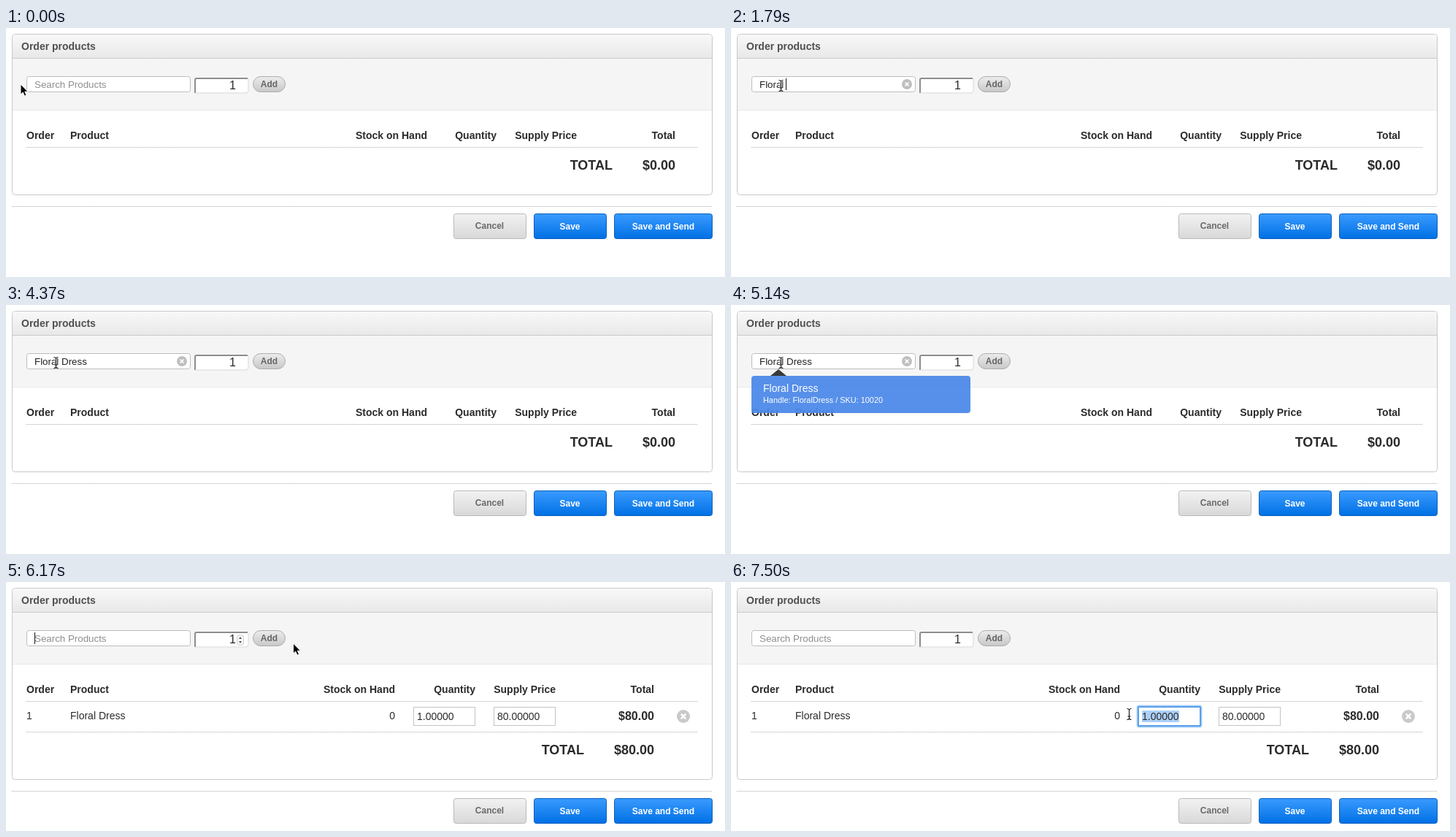
An HTML page for the animation above (8 s loop, 985 px wide and 341 px high).

```html
<!DOCTYPE html>
<html lang="en">
<head>
<meta charset="utf-8">
<title>Order products</title>
<style>
  html, body { margin: 0; width: 100%; height: 100%; overflow: hidden; background: #fff; }
  svg { display: block; font: 14px "Liberation Sans", Arial, sans-serif; cursor: default; }
  text { white-space: pre; fill: #2b2b2b; }
  .b { font-weight: bold; }
  .end { text-anchor: end; }
  .mid { text-anchor: middle; }
  .small { font-size: 12px; font-weight: bold; }
  .big { font-size: 18px; font-weight: bold; }
  .input { font-size: 13.33px; }
  .white { fill: #fff; }
  .dots { stroke: #aaa; stroke-dasharray: 1 1; }
  .field { fill: #fff; stroke: #c4c4c4; }
</style>
</head>
<body>
<svg width="985" height="341" viewBox="0 0 985 341">
  <defs>
    <linearGradient id="head" x2="0" y2="1"><stop stop-color="#f8f8f8"/><stop offset="1" stop-color="#e8e8e8"/></linearGradient>
    <linearGradient id="grey" x2="0" y2="1"><stop stop-color="#f2f2f2"/><stop offset="1" stop-color="#d8d8d8"/></linearGradient>
    <linearGradient id="pill" x2="0" y2="1"><stop stop-color="#ececec"/><stop offset="1" stop-color="#c8c8c8"/></linearGradient>
    <linearGradient id="blue" x2="0" y2="1"><stop stop-color="#3a9bff"/><stop offset="1" stop-color="#0070e4"/></linearGradient>
  </defs>

  <rect id="panel" x="8.5" y="8.5" width="959" height="220" rx="4" fill="#fff" stroke="#c8c8c8"/>
  <path d="M9 41V13q0-4 4-4H963q4 0 4 4V41Z" fill="url(#head)"/>
  <path d="M9 41.5H967" stroke="#cacaca"/>
  <path d="M9 42H967V112H9Z" fill="#f5f5f5"/>
  <path d="M9 112.5H967" stroke="#e9e9e9"/>
  <text class="b" x="21" y="30" style="fill:#505050">Order products</text>

  <rect x="28.5" y="66.5" width="224" height="21" rx="3" fill="#fff" stroke="#bdbdbd"/>
  <text id="query" class="input" x="39" y="82"></text>
  <g id="clear" transform="translate(241 77)">
    <circle r="7" fill="#bfbfbf"/><path d="M-2.5-2.5l5 5m0-5l-5 5" stroke="#fff" stroke-width="1.7"/>
  </g>
  <rect id="caret" y="69" width="1" height="16" fill="#111"/>

  <rect x="258" y="68" width="74.5" height="21.5" rx="3" fill="#fff"/>
  <path d="M259 89V71q0-2 2-2H331" fill="none" stroke="#8d8d8d" stroke-width="2"/>
  <path d="M259 89H329q3 0 3-3V69" fill="none" stroke="#d5d5d5"/>
  <text class="end" x="315" y="84" font-size="16">1</text>
  <g id="spinner">
    <rect x="316.5" y="72.5" width="9" height="14" rx="4" fill="#fafafa" stroke="#c9c9c9"/>
    <path d="M319 78l2-3 2 3ZM319 81l2 3 2-3Z" fill="#555"/>
  </g>
  <rect x="338.5" y="66.5" width="44" height="21" rx="10.5" fill="url(#pill)" stroke="#adadad"/>
  <text class="small mid" x="360.5" y="81" style="fill:#666">Add</text>

  <text class="b" x="28" y="152">Order</text>
  <text class="b" x="88" y="152">Product</text>
  <text id="stockHead" class="b end" y="152">Stock on Hand</text>
  <text id="qtyHead" class="b end" y="152">Quantity</text>
  <text id="priceHead" class="b end" y="152">Supply Price</text>
  <text id="totalHead" class="b end" y="152">Total</text>

  <text id="updating" x="28" y="183">Updating...</text>
  <g id="row">
    <path class="dots" d="M28 163.5H948"/>
    <text x="28" y="188">1</text>
    <text x="88" y="188">Floral Dress</text>
    <text class="end" x="533" y="188">0</text>
    <rect class="field" x="558.5" y="171.5" width="84" height="25"/>
    <g id="focus" fill="none">
      <rect x="556.5" y="169.5" width="88" height="29" rx="2.5" stroke="#a9d0f8" stroke-width="2"/>
      <rect x="558" y="171" width="85" height="26" rx="1" stroke="#5a9fe8" stroke-width="2"/>
    </g>
    <rect id="selection" y="176" height="16" fill="#acd0f8"/>
    <text x="563" y="189">1.00000</text>
    <rect class="field" x="668.5" y="171.5" width="84" height="25"/>
    <text x="673" y="189">80.00000</text>
    <text class="b end" x="888" y="189" font-size="16">$80.00</text>
    <circle cx="928" cy="184" r="9" fill="#c9c9c9"/>
    <path d="M924.7 180.7l6.6 6.6m0-6.6l-6.6 6.6" stroke="#fff" stroke-width="2.4"/>
  </g>

  <g id="footer">
    <path class="dots" d="M28 163.5H947"/>
    <text id="sumLabel" class="big end" y="194">TOTAL</text>
    <text id="sum" class="big end" y="194"></text>
    <path class="dots" d="M8 244.5H968"/>
    <rect x="613.5" y="254.5" width="99" height="34" rx="3" fill="url(#grey)" stroke="#b9b9b9"/>
    <text class="small mid" x="662.5" y="275" style="fill:#6a6a6a">Cancel</text>
    <rect x="723.5" y="254.5" width="99" height="34" rx="3" fill="url(#blue)" stroke="#0a5fc0"/>
    <text class="small mid white" x="772.5" y="276">Save</text>
    <rect x="833.5" y="254.5" width="134" height="34" rx="3" fill="url(#blue)" stroke="#0a5fc0"/>
    <text class="small mid white" x="900.5" y="276">Save and Send</text>
  </g>

  <g id="menu">
    <path d="M54 97L65 88 76 97Z" fill="#3a3a3a"/>
    <rect x="28" y="97" width="300" height="51" rx="4" fill="#4d8ae9" fill-opacity=".94"/>
    <text class="white" x="44" y="119">Floral Dress</text>
    <text class="white" x="44" y="134" font-size="10.9">Handle: FloralDress / SKU: 10020</text>
  </g>

  <path id="arrow" d="M0 0V14L3.2 11.1 5.5 16.2 8 15.1 5.8 10.2H10Z" fill="#000" stroke="#fff"/>
  <g id="beam" fill="none">
    <path d="M0-6V6" stroke="#fff" stroke-width="3" opacity=".7"/>
    <path d="M-3-7.5Q-.5-7.5 0-6 .5-7.5 3-7.5M0-6V6M-3 7.5Q-.5 7.5 0 6 .5 7.5 3 7.5M-2 3H2" stroke="#111" stroke-width="1.1"/>
  </g>
</svg>

<script>
const LOOP = 8000;
const MENU_OPEN = 4600, PICKED = 5260, LOADED = 5620, PRESS = 6930;
const PHRASE = 'Floral Dress';
// [time, characters typed]
const TYPED = [[0, 0], [1210, 1], [1270, 2], [1440, 3], [1560, 5], [1740, 6], [1790, 7],
  [2090, 8], [2330, 9], [2450, 10], [2690, 11], [2870, 12], [PICKED, 0]];
const CARET_ON = [[500, 980], [1210, 3350], [3890, 4370], [MENU_OPEN, 5140], [PICKED, PRESS]];
// [time, x, y]
const PATH = [[50, 20, 77], [290, 44, 68], [530, 68, 79], [5870, 68, 79], [5990, 170, 75], [6110, 325, 79],
  [6170, 393.5, 84], [6350, 490, 130], [6530, 556, 172], [6690, 580, 186], [6870, 618, 187],
  [6990, 618, 187], [7250, 585, 184], [7490, 545, 181]];
const FIELDS = [[28, 66, 253, 88], [258, 68, 332, 90], [558, 171, 643, 197]];

const el = {};
document.querySelectorAll('svg [id]').forEach(node => el[node.id] = node);

const show = (node, on) => node.setAttribute('visibility', on ? 'visible' : 'hidden');
const move = (node, x, y) => node.setAttribute('transform', `translate(${x} ${y})`);
const setX = (node, x) => node.setAttribute('x', x);
const within = (t, [from, to]) => t >= from && t < to;

function pointerAt(time) {
  const t = Math.floor((time - 50) / 60) * 60 + 50;
  const next = PATH.findIndex(p => p[0] > t);
  if (next < 0) return PATH.at(-1).slice(1);
  if (next === 0) return PATH[0].slice(1);
  const [t0, x0, y0] = PATH[next - 1], [t1, x1, y1] = PATH[next];
  const k = (t - t0) / (t1 - t0);
  return [x0 + (x1 - x0) * k, y0 + (y1 - y0) * k];
}

function drawSearch(t) {
  const typed = PHRASE.slice(0, TYPED.findLast(k => t >= k[0])[1]);
  el.query.textContent = typed || 'Search Products';
  el.query.style.fill = typed ? '#222' : '#8e8e8e';
  const width = typed ? el.query.getComputedTextLength() : 0;
  setX(el.caret, Math.max(39, Math.floor(39 + width) - 1));
  show(el.caret, CARET_ON.some(span => within(t, span)));
  show(el.clear, typed);
  show(el.menu, within(t, [MENU_OPEN, PICKED]));
}

function drawTable(t) {
  const loaded = t >= LOADED;
  const updating = within(t, [PICKED, LOADED]);
  const shift = loaded ? 42 : updating ? 31 : 0;
  setX(el.stockHead, loaded ? 533 : 577);
  setX(el.qtyHead, loaded ? 643 : 672);
  setX(el.priceHead, loaded ? 753 : 782);
  setX(el.totalHead, loaded ? 888 : 917);
  setX(el.sumLabel, loaded ? 792 : 831);
  setX(el.sum, loaded ? 888 : 917);
  el.sum.textContent = loaded ? '$80.00' : '$0.00';
  show(el.updating, updating);
  show(el.row, loaded);
  el.row.style.display = loaded ? '' : 'none';
  move(el.footer, 0, shift);
  el.panel.setAttribute('height', 220 + shift);
}

function drawPointer(t) {
  const [x, y] = pointerAt(t);
  const dragging = t >= PRESS;
  const overText = dragging || FIELDS.some(([l, top, r, b]) => x >= l && x <= r && y >= top && y <= b);
  show(el.arrow, !overText);
  show(el.beam, overText);
  move(el.arrow, x, y);
  move(el.beam, Math.round(x) + .5, Math.round(y));
  show(el.spinner, within(t, [6050, 6230]));

  const digit = 7.78, right = 614;
  const left = Math.max(563, right - Math.max(0, Math.round((right - x) / digit)) * digit);
  show(el.focus, dragging);
  show(el.selection, dragging);
  setX(el.selection, left);
  el.selection.setAttribute('width', right - left);
}

function frame(now) {
  const t = now % LOOP;
  drawSearch(t);
  drawTable(t);
  drawPointer(t);
}

const start = performance.now();
function tick() {
  frame(performance.now() - start);
  requestAnimationFrame(tick);
}
tick();
</script>
</body>
</html>
```
